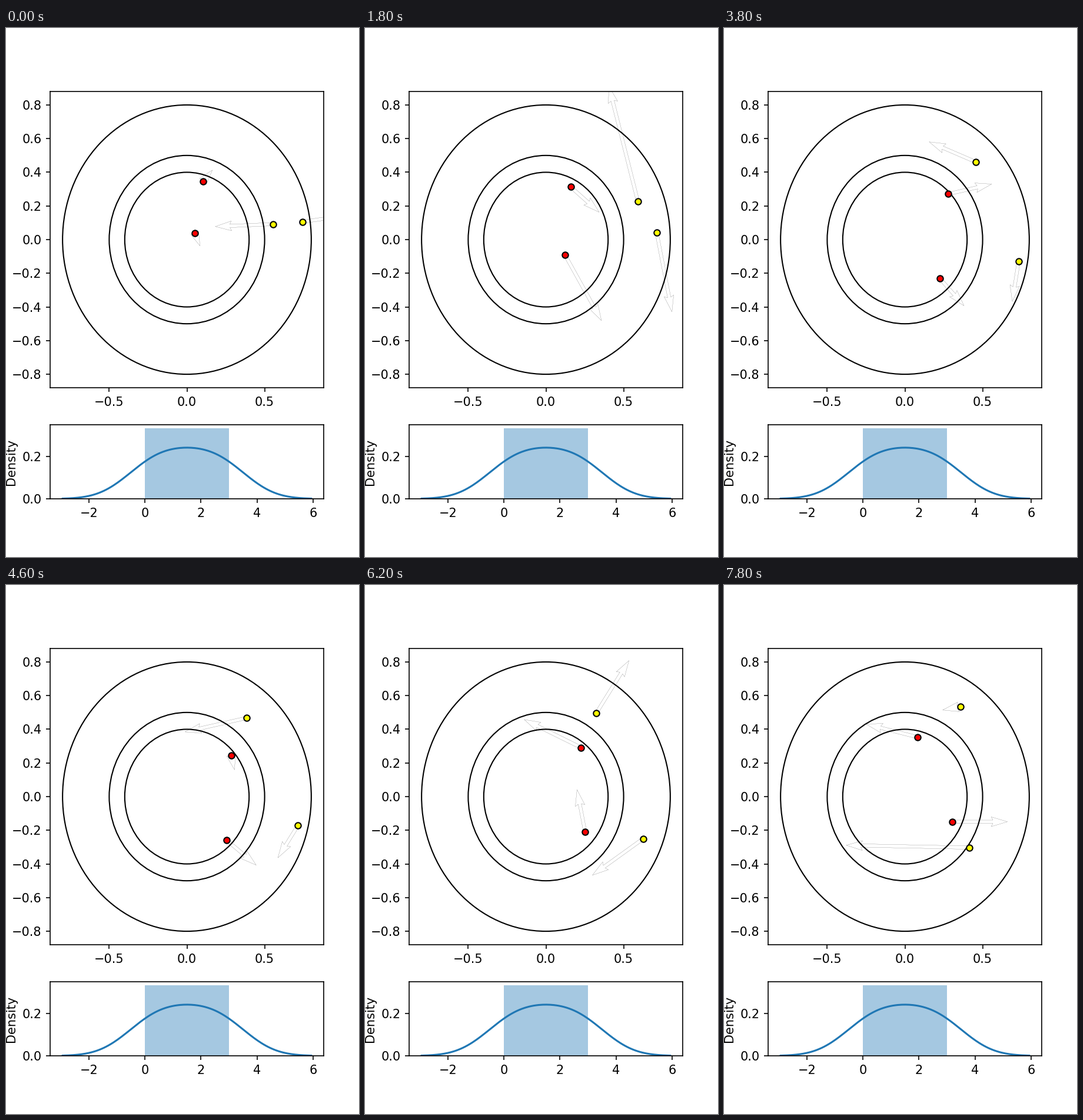
These frames come from a looping animation (600x900 px, 8 s). A matplotlib script:

```python
import numpy as np
import matplotlib.pyplot as plt
from matplotlib.animation import FuncAnimation
from matplotlib.patches import Circle

FRAMES, INTERVAL = 40, 200
LIM = 0.88
DT = 0.05                                   # time covered by one frame
PX = np.array([465, -504]) / (2 * LIM)      # stage pixels per data unit
CENTRE = np.array([307.75, 360.25])

# Each particle: colour and its flights from wall to wall. A flight lists
# a few key points (frame, x, y, vx, vy) in stage pixels; the next flight
# starts at its last point with the velocity mirrored at the wall.
PARTICLES = [
    ("red", [[(0, 335, 261, 16, -19), (19.9, 384.3, 281.7, 76, -29)],
             [(27.5, 383.5, 283.3, -15, -92)],
             [(39, 329, 259, -87, -22)]]),
    ("red", [[(0, 321, 349, 9, 22), (15, 358, 415, 51, 66),
              (25.6, 383.1, 440.4, 65, 47)],
             [(39, 388, 403, 94, 0)]]),
    ("yellow", [[(0, 454, 334, -98, 4), (2.3, 439, 334, -195, 0)],
                [(9, 464, 295, -49, -195), (19, 428, 228, -79, -34),
                 (27.4, 382.8, 242.3, -140, 128)],
                [(39, 402, 207, -30, 6)]]),
    ("yellow", [[(0, 504, 330, 105, -15), (2.2, 517, 328, 150, -30)],
                [(9, 496, 348, 26, 135), (26, 490, 417, -55, 50),
                 (39, 417, 447, -209, -4)]]),
]


def reflect(pos, vel):
    """Mirror the velocity at a circular wall through pos."""
    n = pos / np.hypot(*pos)
    return vel - 2 * vel.dot(n) * n


def arcs(flights):
    """Pairs of (frame, position, velocity) that bound each smooth arc."""
    result, last = [], None
    for flight in flights:
        for frame, x, y, vx, vy in flight:
            knot = frame, (np.array([x, y]) - CENTRE) / PX, np.array([vx, vy]) / PX
            if last:
                result.append((last, knot))
            last = knot
        last = last[0], last[1], reflect(*last[1:])
    return result


def state(path, frame):
    """Position and velocity on the cubic arc that covers the frame."""
    (f0, p0, v0), (f1, p1, v1) = next(a for a in path if frame <= a[1][0])
    span = (f1 - f0) * DT
    s = (frame - f0) / (f1 - f0)
    pos = (p0 + (p1 - p0) * s * s * (3 - 2 * s)
           + span * (v0 * s * (1 - s) ** 2 - v1 * s * s * (1 - s)))
    vel = (6 * s * (1 - s) * (p1 - p0) / span
           + v0 * (1 - s) * (1 - 3 * s) + v1 * s * (3 * s - 2))
    return pos, vel


fig = plt.figure(figsize=(4, 6), dpi=150)
top, low = fig.subplots(2, 1, gridspec_kw={"height_ratios": [4, 1]})

top.set(xlim=(-LIM, LIM), ylim=(-LIM, LIM),
        xticks=[-0.5, 0, 0.5], yticks=np.arange(-4, 5) / 5)
for radius in (0.4, 0.5, 0.8):
    top.add_patch(Circle((0, 0), radius, fill=False, ec="k", lw=1))

# Kernel density of the values 0..3 over their histogram
data = np.arange(4)
bw = data.std(ddof=1) * len(data) ** -0.2
grid = np.linspace(-3 * bw, 3 + 3 * bw, 200)
kernels = np.exp(-0.5 * ((grid[:, None] - data) / bw) ** 2)
density = kernels.mean(axis=1) / (bw * np.sqrt(2 * np.pi))
low.bar(1.5, 1 / 3, width=3, color="C0", alpha=0.4)
low.plot(grid, density, color="C0", lw=1.5)
margin = 0.05 * (grid[-1] - grid[0])
low.set(xlim=(grid[0] - margin, grid[-1] + margin), ylim=(0, 0.35),
        xticks=range(-2, 7, 2), yticks=[0, 0.2], ylabel="Density")

paths = [arcs(flights) for _, flights in PARTICLES]
zero = np.zeros(len(paths))
arrows = top.quiver(zero, zero, zero, zero, angles="xy", scale_units="xy",
                    scale=1, units="dots", width=5.5, facecolors="none",
                    edgecolors="k", linewidths=0.08)
dots = [top.plot([], [], "o", ms=5, mfc=color, mec="k", mew=1)[0]
        for color, _ in PARTICLES]


def update(frame):
    pos, vel = np.array([state(p, frame) for p in paths]).transpose(1, 0, 2)
    arrows.set_offsets(pos)
    arrows.set_UVC(*vel.T)
    for dot, (x, y) in zip(dots, pos):
        dot.set_data([x], [y])
    return [arrows, *dots]


anim = FuncAnimation(fig, update, frames=FRAMES, interval=INTERVAL,
                     repeat=True, repeat_delay=0)
plt.show()
```
